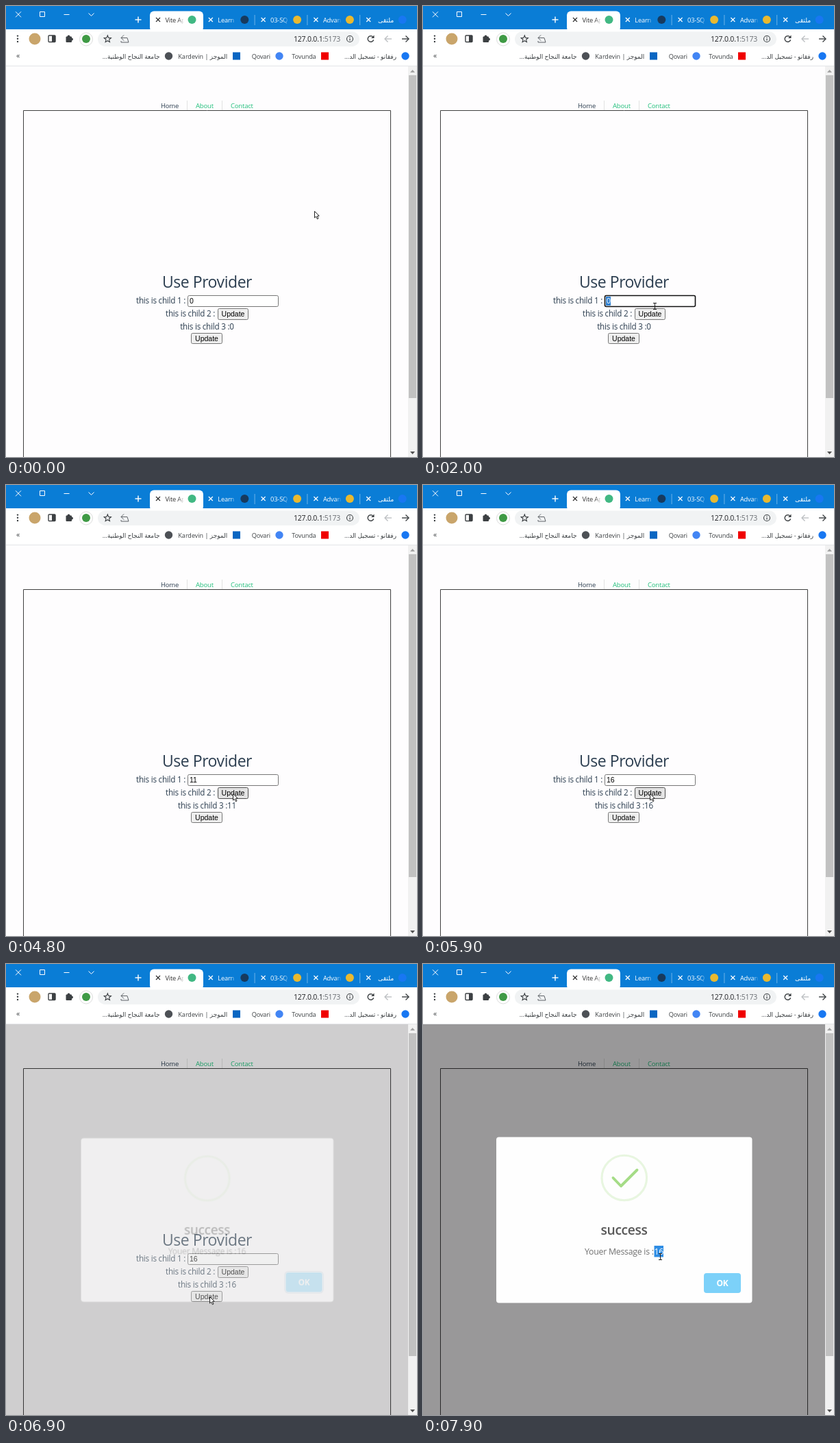
Write an HTML page with a canvas that moves like this. It is 600x658 px and loops after 8 s.

```html
<!DOCTYPE html>
<html lang="en">
<head>
<meta charset="utf-8">
<title>Use Provider</title>
<style>
  html, body { margin: 0; width: 100%; height: 100%; overflow: hidden; background: #fff; }
  canvas, #shade { position: absolute; left: 0; top: 0; }
  #shade { top: 88px; width: 587px; height: 570px; overflow: hidden; background: rgba(0, 0, 0, .4); opacity: 0; }
  #dialog { top: -88px; transform-origin: 293.5px 373.5px; }
</style>
</head>
<body>
<canvas id="page" width="600" height="658"></canvas>
<div id="shade"><canvas id="dialog" width="600" height="658"></canvas></div>
<canvas id="pointer" width="600" height="658"></canvas>
<script>
const LOOP = 8000, STEP = 100;
const FOCUS = 1600, SELECT = 1800, TYPE = 2400, CLICK = 4700;
const OPEN = 6818, SELECT_MESSAGE = 7700;
const MID = 293.5;          // centre of the page column
const UI = '"Open Sans", "Noto Sans", "DejaVu Sans", sans-serif';
const FORM = '"Liberation Sans", Arial, sans-serif';
const INK = '#2c3e50', LINK = '#22bf7c', DARK = '#3c4043';

const shade = document.getElementById('shade');
const [page, dialog, pointer] = ['page', 'dialog', 'pointer']
  .map(id => document.getElementById(id).getContext('2d'));

// ---------- timing ----------
const clamp = v => Math.min(1, Math.max(0, v));
const smooth = p => clamp(p) ** 2 * (3 - 2 * clamp(p));

// CSS "ease": cubic-bezier(.25, .1, .25, 1)
function ease(p) {
  const curve = (a, b, u) => 3 * a * u * (1 - u) ** 2 + 3 * b * u * u * (1 - u) + u ** 3;
  let lo = 0, hi = 1;
  for (let i = 0; i < 20; i++) {
    const mid = (lo + hi) / 2;
    if (curve(.25, .25, mid) < clamp(p)) lo = mid; else hi = mid;
  }
  return curve(.1, 1, hi);
}

// ---------- drawing helpers ----------
function text(c, str, x, y, size, color, o = {}) {
  c.font = `${o.weight || 400} ${size}px ${o.font || UI}`;
  c.letterSpacing = (o.font || o.rtl ? 0 : -.02 * size) + 'px';
  c.direction = o.rtl ? 'rtl' : 'ltr';
  c.textAlign = o.align || 'left';
  c.fillStyle = color;
  c.fillText(str, x, y);
}

function paint(c, fill, stroke, width = 1) {
  if (fill) { c.fillStyle = fill; c.fill(); }
  if (stroke) { c.strokeStyle = stroke; c.lineWidth = width; c.stroke(); }
}

function rect(c, x, y, w, h, fill) {
  c.fillStyle = fill;
  c.fillRect(x, y, w, h);
}

function box(c, x, y, w, h, r, ...style) {
  c.beginPath();
  c.roundRect(x, y, w, h, r);
  paint(c, ...style);
}

function dot(c, x, y, r, ...style) {
  c.beginPath();
  c.arc(x, y, r, 0, 7);
  paint(c, ...style);
}

// points are a flat list of x, y pairs
function path(c, points, ...style) {
  c.beginPath();
  for (let i = 0; i < points.length; i += 2) c.lineTo(points[i], points[i + 1]);
  paint(c, ...style);
}

const hline = (c, x, y, r, color, w = 1) => path(c, [x - r, y, x + r, y], null, color, w);
const vline = (c, x, y, r, color, w = 1) => path(c, [x, y - r, x, y + r], null, color, w);

function cross(c, x, y, r, color, width) {
  path(c, [x - r, y - r, x + r, y + r], null, color, width);
  path(c, [x + r, y - r, x - r, y + r], null, color, width);
}

// horizontal arrow, dir is -1 for left and 1 for right
function arrow(c, x, y, r, dir, color, width) {
  const tip = x + r * dir, back = tip - .9 * r * dir;
  hline(c, x, y, r, color, width);
  path(c, [back, y - .9 * r, tip, y, back, y + .9 * r], null, color, width);
}

const triangle = (c, x, y, dir, color) =>
  path(c, [x - 3.5, y - 2 * dir, x + 3.5, y - 2 * dir, x, y + 2 * dir], color);

// ---------- browser ----------
function tabStrip(c) {
  rect(c, 0, 0, 600, 34, '#0a7dd6');
  cross(c, 18, 12.3, 4, '#fff');
  box(c, 49.5, 8.5, 7, 7, 0, null, '#fff');
  hline(c, 88.5, 12.5, 4, '#fff');
  path(c, [120.5, 10.5, 124.5, 14.5, 128.5, 10.5], null, '#fff');
  hline(c, 193, 20, 4.5, '#fff', 1.4);
  vline(c, 193, 20, 4.5, '#fff', 1.4);
  box(c, 210, 7.6, 78, 30, 6, '#fff');

  const labels = ['Vite Ap', 'Learn', '03-SQ', 'Advan', 'ملتقى'];
  const icons = ['#41b883', '#173a5e', '#e9b92f', '#e9b92f', '#1877f2'];
  labels.forEach((label, i) => {
    const x = 222 + 76.8 * i, color = i ? '#fff' : '#333', rtl = i === 4;
    cross(c, x, 20, 3, color, 1.2);
    if (i > 1) vline(c, x - 12.5, 20.5, 7.5, '#6db3e8');
    const fade = c.createLinearGradient(x + 29, 0, x + 38, 0);
    fade.addColorStop(0, color);
    fade.addColorStop(1, color + '0');
    text(c, label, x + (rtl ? 37 : 10.5), 24, 9.3, rtl ? color : fade,
      { rtl, align: rtl ? 'right' : 'left' });
    dot(c, x + 49.5, 20, 6, icons[i]);
  });
}

function toolbar(c) {
  rect(c, 0, 34, 600, 53, '#fff');
  for (let i = -1; i < 2; i++) dot(c, 17, 47.8 + 4.2 * i, 1.2, DARK);
  dot(c, 42, 48, 8.5, '#c9a56b');
  box(c, 62, 43, 10, 9.5, 1, null, DARK, 1.4);
  rect(c, 67, 43, 5, 9.5, DARK);
  box(c, 87.5, 44.5, 8.5, 8.5, 1, DARK);
  dot(c, 91.5, 44.3, 1.9, DARK);
  dot(c, 96, 48.5, 1.9, DARK);
  dot(c, 117, 48.5, 9.5, '#fff', '#dcdcdc');
  dot(c, 117, 48, 6, '#3f9a45');

  box(c, 134, 37.5, 382, 21.5, 10.7, '#f1f3f4');
  const star = [];
  for (let i = 0; i < 12; i++) {
    const a = i * Math.PI / 5 - Math.PI / 2, r = i % 2 ? 2.4 : 5.4;
    star.push(148.3 + r * Math.cos(a), 48.3 + r * Math.sin(a));
  }
  path(c, star, null, DARK, 1.1);
  arrow(c, 172.5, 46.5, 4.5, -1, '#5f6368');
  path(c, [168, 51, 168, 53, 179, 53, 177, 46.5], null, '#5f6368');
  text(c, '127.0.0.1', 420, 51.8, 10.5, '#202124');
  text(c, ':5173', 488, 51.8, 10.5, '#6a6e73', { align: 'right' });
  dot(c, 502, 48, 4.5, null, DARK, 1.1);
  vline(c, 502, 49, 1.6, DARK, 1.2);
  dot(c, 502, 45.8, .7, DARK);

  c.beginPath();
  c.arc(532.5, 48, 4.3, .3, 5.5);
  paint(c, null, DARK, 1.4);
  path(c, [537.5, 42.5, 537.5, 47, 533, 47], DARK);
  arrow(c, 558, 48, 5, -1, '#b9bcbf', 1.3);
  arrow(c, 583, 48, 5, 1, DARK, 1.4);
}

function bookmarks(c) {
  const entries = [
    ['رفقانو - تسجيل الد...', 583, '#1877f2'],
    ['Tovunda', 465.5, '#f00000', 'square'],
    ['Qovari', 399, '#4285f4'],
    ['الموجز | Kardevin', 336.5, '#0a66c2', 'square'],
    ['جامعة النجاح الوطنية...', 237.5, '#4d5156']
  ];
  for (const [label, x, color, square] of entries) {
    const rtl = label[0] > 'z';
    text(c, label, x - 13, 76.5, rtl ? 9 : 9.2, DARK, { rtl, align: 'right' });
    if (square) rect(c, x - 5.5, 67.5, 11, 11, color);
    else dot(c, x, 73, 5.7, color);
  }
  text(c, '«', 15, 76, 10.5, DARK);
  rect(c, 0, 87, 600, 1, '#e3e5e8');
}

function scrollbar(c) {
  rect(c, 587, 88, 13, 570, '#f1f1f1');
  rect(c, 588, 101, 11, 471, '#c1c1c1');
  triangle(c, 593.5, 95, -1, '#a3a3a3');
  triangle(c, 593.5, 652, 1, '#505050');
}

// ---------- page ----------
const BUTTONS = [[309.5, 441.5, 44, 16], [270.5, 477.5, 45, 15]];
const inside = ([x, y, w, h], [px, py]) => px >= x && px <= x + w && py >= y && py <= y + h;

function valueAt(t) {
  if (t < TYPE) return 0;
  if (t < CLICK) return t < TYPE + 300 ? 1 : 10;
  return Math.min(16, 11 + Math.floor((t - CLICK) / 210));
}

function drawPage(c, t, at) {
  const value = String(valueAt(t));
  rect(c, 0, 0, 600, 658, '#fefdfe');
  ['Home', 'About', 'Contact'].forEach((label, i) => {
    const x = 226 + 51 * i;
    text(c, label, x, 148.5, 9.5, i ? LINK : INK);
    if (i) vline(c, x - 12.5, 145, 7, '#e2e2e2');
  });
  box(c, 25.5, 152.5, 536, 520, 0, null, '#404040');

  const center = { align: 'center' };
  text(c, 'Use Provider', MID, 410.5, 23, INK, center);
  text(c, 'this is child 1 :', 190, 433.5, 11.7, INK);
  text(c, 'this is child 2 :', 233, 452.5, 11.7, INK);
  text(c, 'this is child 3 :' + value, MID, 472, 11.7, INK, center);

  const focused = t >= FOCUS && t < CLICK, selected = t >= SELECT && t < TYPE;
  box(c, 265.5, 422.5, 132, 16, 2, '#fff', focused ? '#101010' : '#767676', focused ? 1.6 : 1);
  if (selected) rect(c, 267, 424, 7, 13, '#2f80d0');
  text(c, value, 268, 434, 10.5, selected ? '#fff' : '#000', { font: FORM });

  for (const b of BUTTONS) {
    const hover = t < OPEN && inside(b, at);
    box(c, ...b, 2, hover ? '#e3e3e3' : '#efefef', hover ? '#4f4f4f' : '#767676');
    text(c, 'Update', b[0] + b[2] / 2, b[1] + 11.3, 10.5, '#000', { font: FORM, align: 'center' });
  }
  scrollbar(c);
  tabStrip(c);
  toolbar(c);
  bookmarks(c);
}

// ---------- dialog ----------
function checkMark(c, p) {
  dot(c, MID + .3, 312, 32.8, null, 'rgba(165, 220, 134, .26)', 3.1);
  if (p <= 0) return;
  c.save();
  c.lineCap = c.lineJoin = 'round';
  c.setLineDash([52 * p, 60]);
  path(c, [277.5, 312, 289, 324, 312.5, 300.5], null, '#a5dc86', 3.9);
  c.restore();
}

// grows past full size, then swings back and settles
function popScale(p) {
  if (p < .45) return .5 + .55 * ease((p - .01) / .44);
  return 1 + .05 * Math.cos(1.5 * Math.PI * (clamp(p) - .45) / .55);
}

function drawDialog(c, t) {
  const age = t - OPEN;
  shade.style.opacity = ease(age / 300);
  if (age < 0) return;
  c.canvas.style.opacity = ease(age / 200);
  c.canvas.style.transform = `scale(${popScale(age / 300)})`;

  c.clearRect(0, 0, 600, 658);
  box(c, 107, 252.5, 373.5, 242, 4, '#fefefe');
  checkMark(c, smooth((age / 750 - .55) / .35));
  text(c, 'success', MID, 394.5, 19.3, 'rgba(0, 0, 0, .65)', { weight: 600, align: 'center' });

  const grey = 'rgba(0, 0, 0, .56)', selected = t >= SELECT_MESSAGE;
  text(c, 'Youer Message is :', 236, 424, 12.3, grey);
  if (selected) rect(c, 337.5, 411, 13.5, 16.5, '#2f8de4');
  text(c, '16', 351, 424, 12.3, selected ? '#fff' : grey, { align: 'right' });

  if (!selected) {
    box(c, 408, 449, 58, 33, 6, 'rgba(43, 114, 165, .29)');
    box(c, 409, 450, 56, 31, 5, '#fff');
  }
  box(c, 410, 451, 54, 29, 4, '#7cd1f9');
  text(c, 'OK', 437, 470, 12, '#fff', { weight: 700, align: 'center' });
}

// ---------- pointer ----------
// start, end, x, y of each move
const MOVES = [
  [200, 1400, 338, 438],
  [3000, 3500, 340, 475],
  [3700, 4400, 331, 450],
  [6000, 6500, 297, 485],
  [7000, 7500, 346, 427]
];

function pointerAt(t) {
  let x = 450, y = 299;
  for (const [start, end, toX, toY] of MOVES) {
    const k = smooth((t - start) / (end - start));
    x += (toX - x) * k;
    y += (toY - y) * k;
  }
  return [x, y];
}

function overText(t, p) {
  if (t >= OPEN) return inside([230, 410, 127, 20], p);
  return inside([189, 421, 209, 55], p) && !BUTTONS.some(b => inside(b, p));
}

function drawPointer(c, t, at) {
  c.clearRect(0, 0, 600, 658);
  c.save();
  c.translate(...at.map(Math.round));
  if (overText(t, at)) {
    vline(c, .5, 0, 4.5, '#222');
    for (const y of [-4.5, 4.5]) hline(c, .5, y, 2.5, '#222');
  } else {
    path(c, [.5, .5, .5, 10, 2.7, 8, 4.4, 11.8, 6, 11, 4.4, 7.4, 7.2, 7.2, .5, .5], '#fff', '#222');
  }
  c.restore();
}

function frame(now) {
  const t = Math.floor((now % LOOP) / STEP) * STEP;
  const at = pointerAt(t);
  drawPage(page, t, at);
  drawDialog(dialog, t);
  drawPointer(pointer, t, at);
  requestAnimationFrame(frame);
}
requestAnimationFrame(frame);
</script>
</body>
</html>
```
